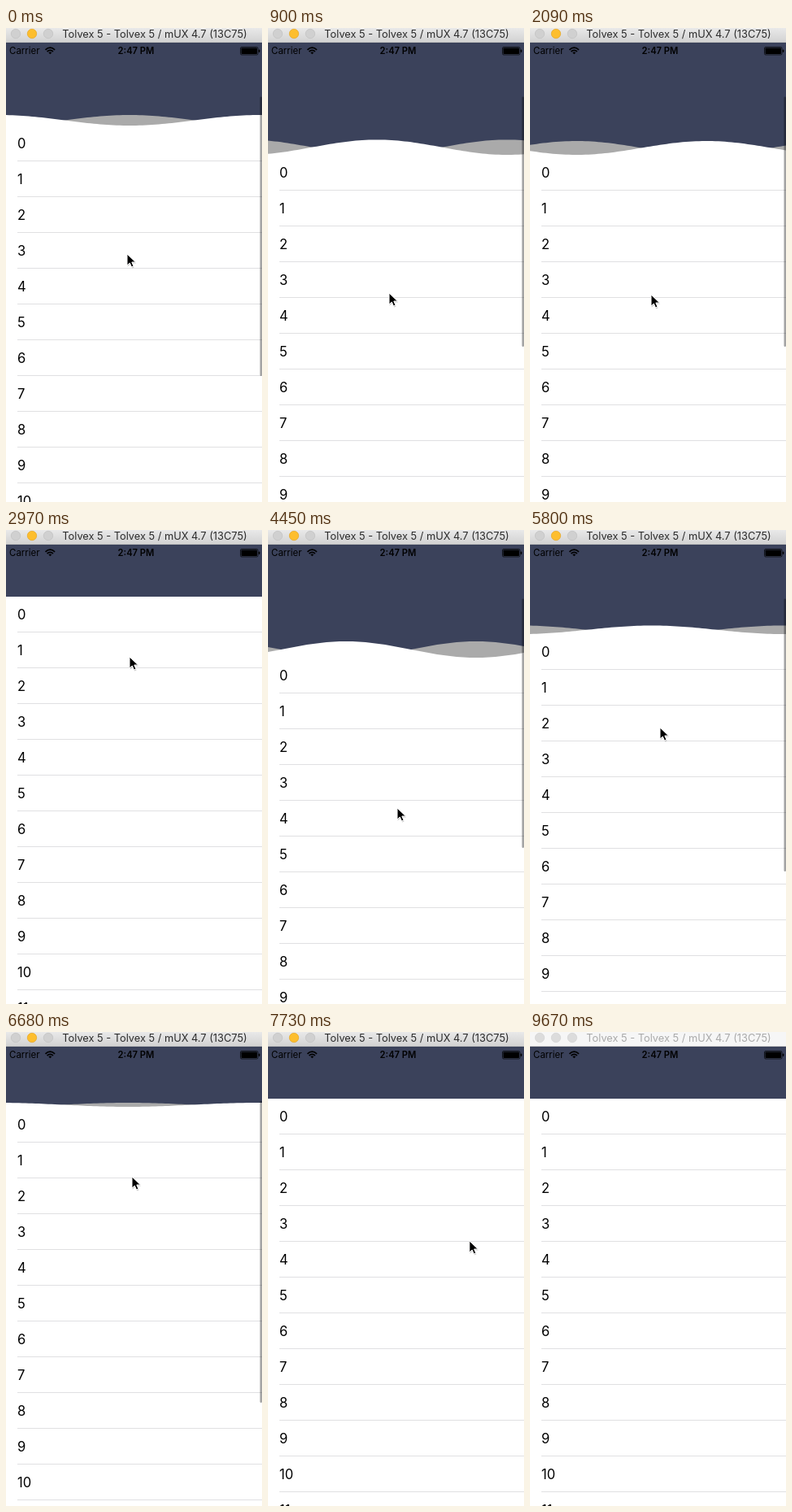
These frames come from a looping animation (315 px wide and 583 px high, 9770 ms). An HTML page:

```html
<!DOCTYPE html>
<html lang="en">
<head>
<meta charset="utf-8">
<title>Wave pull list</title>
<style>
  html, body { margin: 0; width: 100%; height: 100%; overflow: hidden; background: #fff; }
  svg { display: block; width: 100%; height: 100%; font-family: Inter, Roboto, sans-serif; }
  #titlebar text { font-size: 12.8px; fill: #2b2b2b; }
  #titlebar circle { fill: #d0d0d0; stroke: #c0c0c0; stroke-width: .7; }
  #titlebar circle.mid { fill: #fdbe2e; stroke: #e5a522; }
  #titlebar .back { fill: url(#chrome); }
  #titlebar.inactive text { fill: #aaa; }
  #titlebar.inactive circle, #titlebar.inactive circle.mid { fill: #dcdcdc; stroke: #d2d2d2; }
  #titlebar.inactive .back { fill: #f6f6f6; }
  #status { font-size: 11.5px; }
  #rows { font-size: 16.6px; }
</style>
</head>
<body>
<svg viewBox="0 0 315 583">
  <defs>
    <linearGradient id="chrome" x2="0" y2="1">
      <stop stop-color="#e9e9e9"/><stop offset="1" stop-color="#d1d1d1"/>
    </linearGradient>
  </defs>
  <rect y="18" width="315" height="565" fill="#3b425b"/>
  <path id="backWave" fill="#aaa"/>
  <path id="frontWave" fill="#fff"/>
  <g id="rows"></g>
  <rect id="scrollbar" x="312.5" y="84.5" width="2.5" rx="1.2" fill="#000" fill-opacity=".36"/>

  <g id="status">
    <text x="4" y="32.3">Carrier</text>
    <g fill="none" stroke="#000" stroke-width="1.7">
      <path d="M48.5 26.8Q54.3 21.6 60.1 26.8M50.6 29Q54.3 25.7 58 29"/>
      <path d="M52.3 30.2Q54.3 28.6 56.3 30.2L54.3 32.3Z" fill="#000" stroke="none"/>
    </g>
    <text x="160" y="32.3" text-anchor="middle" font-weight="600" font-size="11.2">2:47 PM</text>
    <rect x="288.5" y="23.5" width="21.5" height="9.5" rx="1.5" fill="none" stroke="#000" stroke-width=".7"/>
    <rect x="289.5" y="24.5" width="19.5" height="7.5" rx=".7"/>
    <rect x="310.8" y="26.5" width="1.5" height="3.5" rx=".7"/>
  </g>

  <g id="titlebar">
    <rect class="back" width="315" height="18"/>
    <rect y="17" width="315" height="1" fill="#b4b4b4" fill-opacity=".6"/>
    <circle cx="12" cy="7" r="5.7"/>
    <circle class="mid" cx="32" cy="7" r="5.7"/>
    <circle cx="52" cy="7" r="5.7"/>
    <text x="183" y="12" text-anchor="middle">Tolvex 5 - Tolvex 5 / mUX 4.7 (13C75)</text>
  </g>

  <g id="cursor">
    <path d="M0 0V14L3.3 11 5.5 16 8 15 5.8 10H10.5Z" transform="translate(.6 1.4)" fill-opacity=".2"/>
    <path d="M0 0V14L3.3 11 5.5 16 8 15 5.8 10H10.5Z" stroke="#fff" stroke-width="1" stroke-linejoin="round"/>
  </g>
</svg>
<script>
const LOOP = 9770, STEP = 148.6, INACTIVE_AT = 9670;
const LIST_TOP = 82, ROW = 44, WAVELENGTH = 320;
const el = id => document.getElementById(id);

// Tracks hold [step, value] pairs, joined linearly.
const offsetTrack = [[0, 38], [3, 66], [6, 74], [14, 74], [15, 52], [16, 10], [18, 0], [24, 0],
  [27, 42], [30, 75], [35, 73], [39, 46], [45, 10], [48, 0]];
const heightTrack = [[0, 13], [4, 19], [14, 17], [15, 12], [16, 5], [18, 0], [24, 0],
  [27, 13], [30, 20], [34, 18], [39, 10.5], [45, 5], [48, 0]];
const peakTrack = [[0, 312], [14, -103], [30, -544], [39, -810], [45, -970], [55, -1254]];
const barTrack = [[0, 1], [18, 1], [20, 0], [24, 0], [25, 1], [48, 1], [51, 0]];
const cursorX = [[0, 149], [14, 149], [20, 152], [24, 152], [30, 159], [39, 160], [45, 155],
  [47, 155], [54, 285], [62, 299]];
const cursorY = [[0, 278], [6, 326], [14, 328], [16, 185], [20, 156], [24, 156], [30, 342],
  [34, 342], [39, 243], [45, 178], [47, 172], [54, 291], [62, 586]];

function valueAt(track, step) {
  const next = track.findIndex(([s]) => s > step);
  if (next < 0) return track[track.length - 1][1];
  const [s0, v0] = track[next - 1], [s1, v1] = track[next];
  return v0 + (v1 - v0) * (step - s0) / (s1 - s0);
}

function wavePath(base, height, peak, bottom) {
  let d = `M0 ${bottom}`;
  for (let x = 0; x <= 316; x += 4) {
    const crest = (1 + Math.cos((x - peak) * 2 * Math.PI / WAVELENGTH)) / 2;
    d += `L${x} ${(base - height * crest).toFixed(2)}`;
  }
  return d + `V${bottom}Z`;
}

el('rows').innerHTML = Array.from({ length: 12 }, (_, i) =>
  `<text x="14" y="${109.5 + ROW * i}">${i}</text>
   <rect x="14" y="${125 + ROW * i}" width="301" height="1" fill="#e0e0e2"/>`).join('');

function draw(time) {
  const step = Math.floor((time + 10) / STEP);
  const offset = Math.round(valueAt(offsetTrack, step));
  const height = valueAt(heightTrack, step);
  const peak = valueAt(peakTrack, step);
  const base = LIST_TOP + offset;

  el('backWave').setAttribute('d', wavePath(base, height, peak + WAVELENGTH / 2, base));
  el('frontWave').setAttribute('d', wavePath(base, height, peak, 583));
  el('rows').setAttribute('transform', `translate(0 ${offset})`);
  el('scrollbar').setAttribute('height', 381.5 - offset);
  el('scrollbar').setAttribute('opacity', valueAt(barTrack, step));
  el('cursor').setAttribute('transform',
    `translate(${valueAt(cursorX, step)} ${valueAt(cursorY, step)})`);
  el('titlebar').classList.toggle('inactive', time >= INACTIVE_AT);
}

const start = performance.now();
function tick() {
  draw((performance.now() - start) % LOOP);
  requestAnimationFrame(tick);
}
tick();
</script>
</body>
</html>
```
